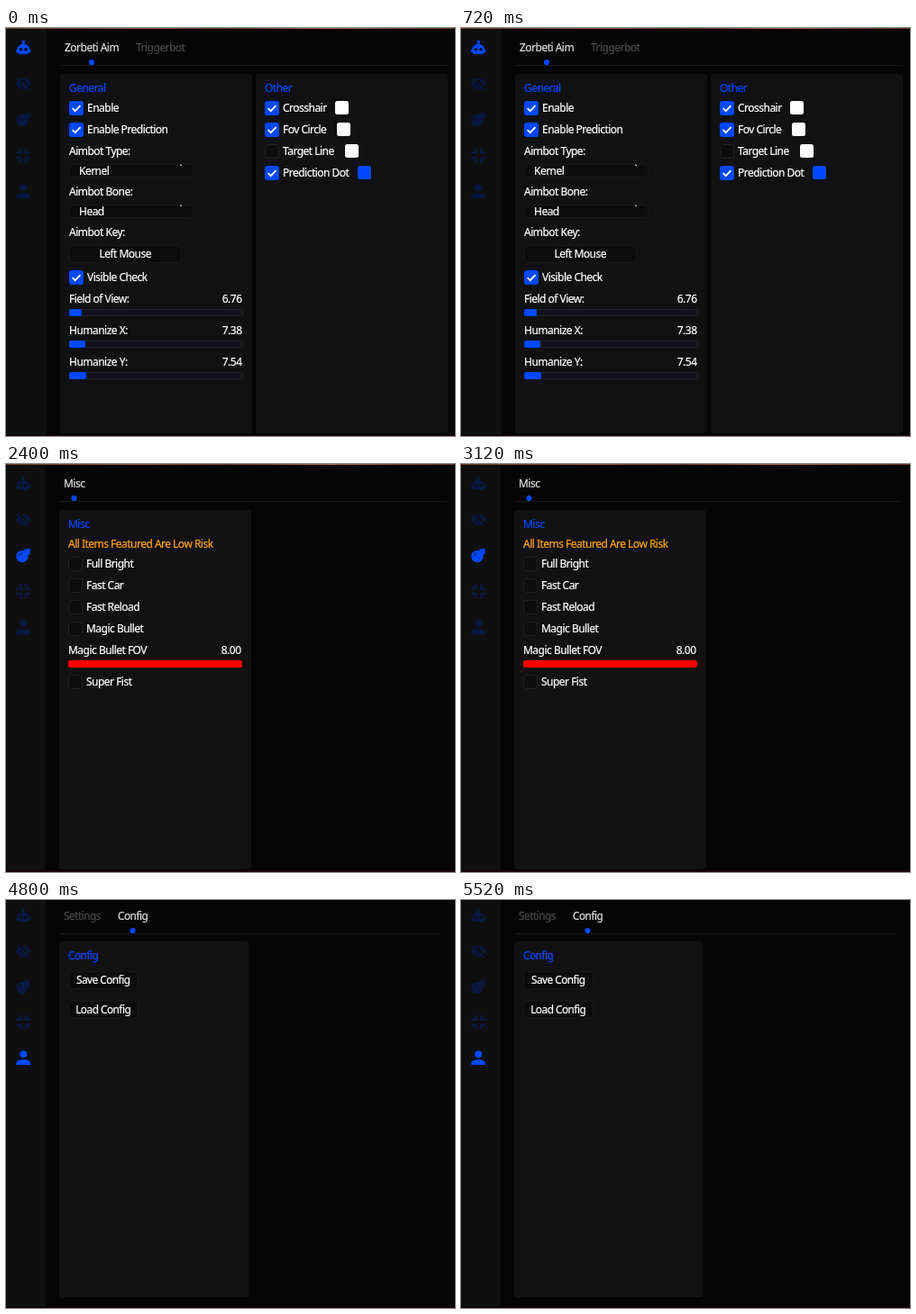
These frames come from a looping animation (498 by 453 pixels, 6000 ms). An HTML page:

```html
<!DOCTYPE html>
<html lang="en">
<head>
<meta charset="utf-8">
<style>
html, body { margin: 0; width: 100%; height: 100%; overflow: hidden; background: #050505; }
svg { display: block; width: 498px; height: 453px; }
text { font-family: "Noto Sans", "Open Sans", sans-serif; letter-spacing: -.043em; white-space: pre; stroke-width: .22; }
</style>
</head>
<body>
<svg id="stage" viewBox="0 0 498 453">
  <defs>
    <linearGradient id="strip">
      <stop offset="0" stop-color="#6b3a22"/>
      <stop offset=".3" stop-color="#a3553a"/>
      <stop offset=".5" stop-color="#7a3028"/>
      <stop offset=".72" stop-color="#b56a48"/>
      <stop offset="1" stop-color="#6a2c20"/>
    </linearGradient>
  </defs>
</svg>
<script>
const PAGE_MS = 1200;
const BLUE = '#0048ff', WHITE = '#ffffff', DIM_BLUE = '#081740', SIDEBAR = '#0f0f0f';
const stage = document.getElementById('stage');

// Icons sit on a 24 unit grid.
const icons = [
  `<path fill-rule="evenodd" d="M11 8V7a1.800 1.800 0 1 1 2 0v1c3.600.3 5.800 2.800 6 6h1v3h-1.300q-.2 1.800-2 1.800H7.300q-1.800 0-2-1.800H4v-3h1C5.200 10.800 7.400 8.300 11 8z
    M9.300 12a1.700 1.700 0 1 0 .01 0zM14.700 12a1.700 1.700 0 1 0 .01 0z"/>`,
  `<path fill-rule="evenodd" d="M3.500 12Q6.500 6 12 6T20.500 12Q17.500 18 12 18T3.500 12z
    M12 8.300a3.700 3.700 0 1 0 .01 0z"/><circle cx="12" cy="12" r="2.400"/>
    <path d="M6 4.500L20 18.500" stroke="${SIDEBAR}" stroke-width="2"/>
    <path d="M5 5.500L18.500 19" stroke="currentColor" stroke-width="1.800"/>`,
  `<circle cx="10.700" cy="13" r="6.700"/><path d="M12.500 6l5.500 5.500 2-2-1.200-1.200 1.200-2.300-2-2-2.300 1.200L14.500 4.500z"/>
    <path d="M7 12.500q.6-2.700 3.300-3" fill="none" stroke="${SIDEBAR}"/>`,
  `<path d="M4 7.800h3.700V4h2.700v6.400H4zM20 7.800h-3.700V4h-2.700v6.400H20zM4 16.200h3.700V20h2.700v-6.400H4zM20 16.200h-3.700V20h-2.700v-6.400H20z"/>`,
  `<circle cx="12" cy="8" r="4"/><path d="M12 14c-2.700 0-8 1.300-8 4v2h16v-2c0-2.700-5.300-4-8-4z"/>`
];

const rect = (x, y, w, h, fill, r = 0, stroke = 'none') =>
  `<rect x="${x}" y="${y}" width="${w}" height="${h}" rx="${r}" fill="${fill}" stroke="${stroke}"/>`;

function painter(scale) {
  const text = (x, y, label, fill = WHITE, anchor = 'start') =>
    `<text x="${x}" y="${y + 4}" font-size="${12 * scale}" fill="${fill}" stroke="${fill}" text-anchor="${anchor}">${label}</text>`;

  const box = (x, y, w, h, r) => rect(x + .5, y + .5, w - 1, h - 1, '#0c0c0c', r, '#191919');

  const swatch = (x, y, fill) => rect(x, y - 8, 15, 15, fill, 2.5);

  // Swatch positions go blue then white unless colours are given.
  const check = (x, y, label, on = false, swatches = [], colors = [BLUE, WHITE]) =>
    (on ? rect(x, y - 8, 16, 16, BLUE, 3) +
      `<path d="M${x + 3.7} ${y + .2}l3 3 5.800-6" fill="none" stroke="${WHITE}" stroke-width="1.900"/>`
      : rect(x + .5, y - 7.5, 15, 15, '#0d0d0d', 3, '#202020')) +
    text(x + 20, y, label) +
    swatches.map((sx, i) => swatch(sx, y, colors[i])).join('');

  const slider = (x, y, w, label, value, filled, color = BLUE) =>
    text(x, y, label) + text(x + w - 1.5, y, value, WHITE, 'end') +
    rect(x + .5, y + 11.5, w - 1, 7, '#121217', 2, '#23232c') +
    rect(x, y + 11, filled, 8, color, 2);

  const combo = (x, y, w, label, value) =>
    text(x, y, label) + box(x, y + 14, w, 15, 5) + text(x + 11, y + 22, value) +
    `<path d="M${x + w - 15} ${y + 14.5}l2 1.500" stroke="${WHITE}"/>`;

  const button = (x, y, w, label) =>
    box(x, y - 10, w, 20, 4) + text(x + w / 2 - .3, y, label, WHITE, 'middle');

  return { text, check, slider, combo, button };
}

function frame({ scale = 1, active, iconY, pitch, tabs, dot, tabY, panels, top, bottom, strip }, body) {
  const p = painter(scale);
  const left = panels[0][0];
  const side = icons.map((icon, i) => {
    const color = i === active ? BLUE : DIM_BLUE;
    return `<g transform="translate(19.300 ${iconY + i * pitch}) scale(${scale}) translate(-12 -12)" fill="${color}" color="${color}">${icon}</g>`;
  }).join('');
  return rect(0, 0, 498, 453, '#050505') +
    rect(0, 0, left - 15, 451, SIDEBAR) + side +
    tabs.map(([x, label, on]) => p.text(x, tabY, label, on ? '#dedede' : '#494949')).join('') +
    rect(left, tabY + 19, 430 * scale, 1, '#171717') +
    `<circle cx="${dot}" cy="${tabY + 16}" r="3.100" fill="${BLUE}"/>` +
    panels.map(([x, w, title]) =>
      rect(x, top, w, bottom - top, '#111111', 4) + p.text(x + 10, top + 16, title, BLUE)).join('') +
    body(p) +
    (strip ? rect(0, 0, 498, 1, 'url(#strip)') : '') +
    rect(0, 451.5, 498, 1.5, '#180609');
}

const tall = { iconY: 22, pitch: 39.8, tabY: 22, top: 51, bottom: 450, strip: true };

const pages = [
  frame({
    ...tall, active: 0, dot: 95,
    tabs: [[65, 'Zorbeti Aim', true], [144, 'Triggerbot']],
    panels: [[60, 213, 'General'], [277, 213, 'Other']]
  }, p =>
    p.check(70, 89, 'Enable', true) +
    p.check(70, 113, 'Enable Prediction', true) +
    p.combo(70, 137, 138, 'Aimbot Type:', 'Kernel') +
    p.combo(70, 182, 138, 'Aimbot Bone:', 'Head') +
    p.text(70, 227, 'Aimbot Key:') +
    p.button(70, 251, 125, 'Left Mouse') +
    p.check(70, 277, 'Visible Check', true) +
    p.slider(70, 301, 193, 'Field of View:', '6.76', 14) +
    p.slider(70, 336, 193, 'Humanize X:', '7.38', 18) +
    p.slider(70, 371, 193, 'Humanize Y:', '7.54', 19) +
    p.check(287, 89, 'Crosshair', true, [365], [WHITE]) +
    p.check(287, 113, 'Fov Circle', true, [367], [WHITE]) +
    p.check(287, 137, 'Target Line', false, [376], [WHITE]) +
    p.check(287, 161, 'Prediction Dot', true, [390])),

  frame({
    scale: .99, active: 1, iconY: 19.5, pitch: 39.5, tabY: 20, dot: 83, top: 48, bottom: 445,
    tabs: [[64.5, 'Players', true], [120, 'World']],
    panels: [[59, 212, 'Player ESP'], [274.5, 212, 'Other']]
  }, p => [
    ['Chams'], ['2D Box', true, [136, 159]], ['Cornered Box'],
    ['Snaplines', false, [147.5, 170.5]], ['Sense Arrow', false, [163.5, 186.5]],
    ['Skeleton', true, [142.5, 165.5]], ['Skeleton Head', true],
    ['Distance', false, [142.5, 165.5]], ['Name', false, [129, 152]], ['Rank'],
    ['Weapon', false, [141, 164]], ['Platform', false, [142, 164.5]]
  ].map((row, i) => p.check(69, 86 + i * 23.8, ...row)).join('') +
    p.slider(285, 86, 191, 'Render Distance:', '75.0', 14) +
    p.check(285, 121, 'Outlined') +
    p.check(285, 145, 'Wireframe') +
    p.combo(285, 168.5, 136, 'Chams Color:', 'Red') +
    ['2D Box Line Thinkness:', '2D Box Rounding:', 'Skeleton Line Thinkness:', 'Snaplines Line Thinkness:']
      .map((label, i) => p.slider(285, 213 + i * 34.75, 191, label, '1.0', 3)).join('') +
    p.slider(285, 352, 191, 'Sense Arrow FOV:', '150.0', 95)),

  frame({
    ...tall, active: 2, dot: 75.5,
    tabs: [[64, 'Misc', true]], panels: [[59, 213, 'Misc']]
  }, p =>
    p.text(69, 89, 'All Items Featured Are Low Risk', '#ffa010') +
    ['Full Bright', 'Fast Car', 'Fast Reload', 'Magic Bullet']
      .map((label, i) => p.check(69, 111 + i * 24, label)).join('') +
    p.slider(69, 207, 193, 'Magic Bullet FOV', '8.00', 193, '#ff0000') +
    p.check(69, 242, 'Super Fist')),

  frame({
    ...tall, active: 3, dot: 79,
    tabs: [[64, 'Radar', true]], panels: [[59, 213, 'Radar']]
  }, p =>
    p.check(69, 89, 'Radar', false, [129, 152]) +
    p.text(69, 113, 'Radar Settings:') +
    p.slider(69, 135, 193, 'Radar Size', '120.000', 69) +
    p.slider(69, 170, 193, 'Radar X', '1635.000', 185) +
    p.slider(69, 205, 193, 'Radar Y', '325.000', 54)),

  frame({
    scale: .985, active: 4, iconY: 17.5, pitch: 39.4, tabY: 18, dot: 140.5, top: 46, bottom: 441,
    tabs: [[64, 'Settings'], [124, 'Config', true]], panels: [[59, 210, 'Config']]
  }, p =>
    p.button(69, 89, 78, 'Save Config') +
    p.button(69, 121.5, 78, 'Load Config'))
];

stage.insertAdjacentHTML('beforeend', pages.map(page => `<g display="none">${page}</g>`).join(''));
const groups = [...stage.querySelectorAll(':scope > g')];

function render(ms) {
  const current = Math.floor(ms / PAGE_MS) % groups.length;
  groups.forEach((group, i) => group.setAttribute('display', i === current ? 'inline' : 'none'));
}

const start = performance.now();
function tick() {
  render(performance.now() - start);
  requestAnimationFrame(tick);
}
tick();
</script>
</body>
</html>
```
